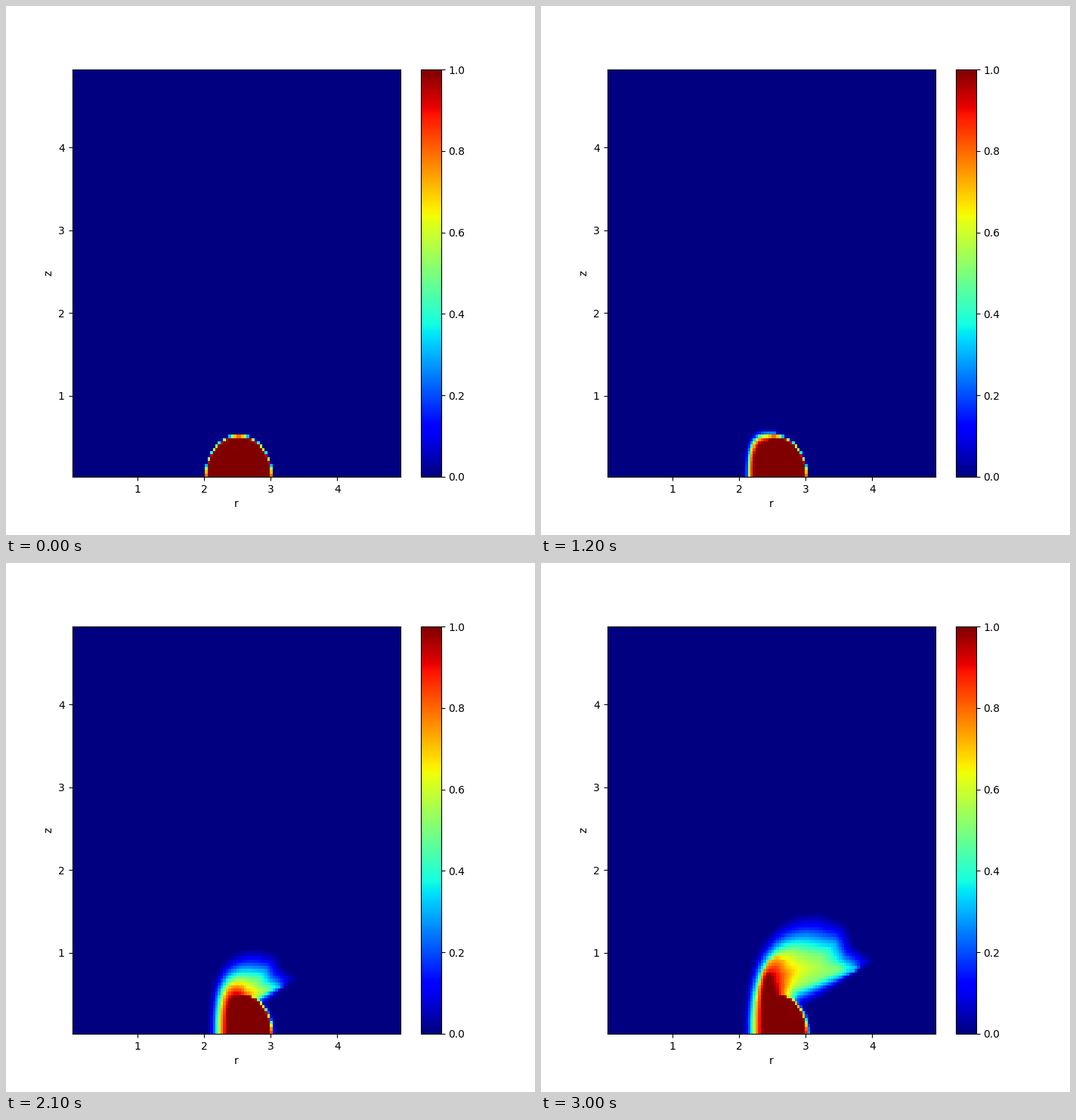
A matplotlib script that plays this animation: 700 px wide and 700 px high, repeating every 3.3 s.

```python
import numpy as np
import matplotlib.pyplot as plt
from matplotlib.animation import FuncAnimation
from matplotlib.path import Path

N = 126                 # visible cells per side
DX = 5 / 128
STEP, FRAMES = 300, 11
FLOOR = 623             # lower edge of the plot in stage pixels

# Cell centres in stage pixels
px = 87.5 + 434 / N * (np.arange(N) + 0.5)
py = FLOOR - 539 / N * (np.arange(N) + 0.5)
GX, GY = np.meshgrid(px, py)
POINTS = np.column_stack([GX.ravel(), GY.ravel()])

# The outline of each level runs: foot, apex, shoulder, tip, belly
BUD = [(269, FLOOR), (302, 561), (311, 561), (327, 572), (324, 585)]
ROOT = (310, 610)
TAIL = [(320, 600), (312, 660)]

# level, lag, inset of the bud, outline when fully grown
BANDS = [
    (0.03, 1.0, 0.00, [(269, FLOOR), (368, 466), (402, 480), (438, 527), (372, 572)]),
    (0.30, 1.3, 0.10, [(277, FLOOR), (350, 496), (388, 503), (420, 537), (340, 572)]),
    (0.50, 1.6, 0.14, [(281, FLOOR), (335, 511), (372, 521), (396, 538), (334, 566)]),
    (0.70, 2.0, 0.18, [(284, FLOOR), (313, 522), (322, 526), (332, 541), (324, 570)]),
    (0.97, 4.0, 0.28, [(291, FLOOR), (302, 543), (306, 547), (310, 560), (314, 574)]),
]


def ramp(t, start, end):
    return np.clip((t - start) / (end - start), 0, 1)


def mix(a, b, f):
    return np.asarray(a) * (1 - f) + np.asarray(b) * f


def disc(radius, sub=12):
    """Share of each cell covered by a disc around r = 2.5, z = 0."""
    s = (np.arange(N * sub) + 0.5) * DX / sub
    inside = (s[None, :] - 2.5) ** 2 + s[:, None] ** 2 < radius ** 2
    return inside.reshape(N, sub, N, sub).mean(axis=(1, 3))


DISC = disc(0.5)


def outline(grow, lag, inset, grown):
    bud = mix(BUD, ROOT, inset)
    foot = mix(bud[0], grown[0], min(1, 3 * grow))[0]
    apex, shoulder, tip, belly = mix(bud, grown, grow ** lag)[1:]
    notch = shoulder + (tip - shoulder) * (0.3, 0.6)
    # Superellipse arc up the windward side
    a = np.linspace(0, np.pi / 2, 14)
    power = 2 / mix(3, 2.4, grow)
    arc = np.column_stack([
        apex[0] - (apex[0] - foot) * np.abs(np.cos(a)) ** power,
        FLOOR - (FLOOR - apex[1]) * np.sin(a) ** power,
    ])
    return np.array([(foot, 660), *arc, shoulder, notch, tip, belly, *TAIL])


def signed_distance(curve):
    """Distance of each cell to the outline, positive inside."""
    step = np.roll(curve, -1, axis=0) - curve
    rel = POINTS[:, None] - curve[None]
    t = np.clip((rel * step).sum(2) / ((step ** 2).sum(1) + 1e-9), 0, 1)
    dist = np.sqrt(((rel - t[..., None] * step) ** 2).sum(2)).min(1)
    inside = Path(curve).contains_points(POINTS)
    return np.where(inside, dist, -dist).reshape(N, N)


def plume(grow):
    levels = [band[0] for band in BANDS] + [1]
    sd = [signed_distance(outline(grow, *band[1:])) for band in BANDS]
    sd.append(sd[-1] - 3)
    v = levels[0] * np.clip(1 + sd[0] / 5, 0, 1)
    for i in range(len(BANDS)):
        share = np.clip(sd[i] / np.maximum(sd[i] - sd[i + 1], 1e-6), 0, 1)
        v += (levels[i + 1] - levels[i]) * share ** (1.25 if i == 0 else 1)
    return v


def field(t):
    if t < 600:
        return DISC
    if t < 900:
        # First trace leaks out at the windward foot
        leak = 0.3 * np.exp(-(np.arange(N) / 2.5) ** 2)[:, None]
        return np.maximum(DISC, leak * np.roll(DISC > 0, -1, axis=1))
    if t < 1200:
        return DISC * ramp(GX, 263, 274)
    # The lee side stays, its rim smears to the right and its crown wears off
    smear = 0.35 * ramp(t, 1800, 2400)
    core = np.maximum(DISC, mix(DISC, np.roll(DISC, 1, axis=1), smear))
    core = core * (GX > 300) * np.where(GY < 572, 1 - ramp(t, 1200, 1800), 1)
    return np.maximum(plume(ramp(t, 1200, 3000)), core)


fig, ax = plt.subplots(figsize=(7, 7), dpi=100)
edges = DX * (np.arange(N + 1) + 0.5)
mesh = ax.pcolormesh(edges, edges, DISC, cmap="jet", vmin=0, vmax=1)
fig.colorbar(mesh, ax=ax)
ax.set_xlabel("r")
ax.set_ylabel("z")


def update(i):
    mesh.set_array(field(i * STEP))
    return mesh,


anim = FuncAnimation(fig, update, frames=FRAMES, interval=STEP, repeat=True,
                     repeat_delay=0, blit=False)
plt.show()
```
